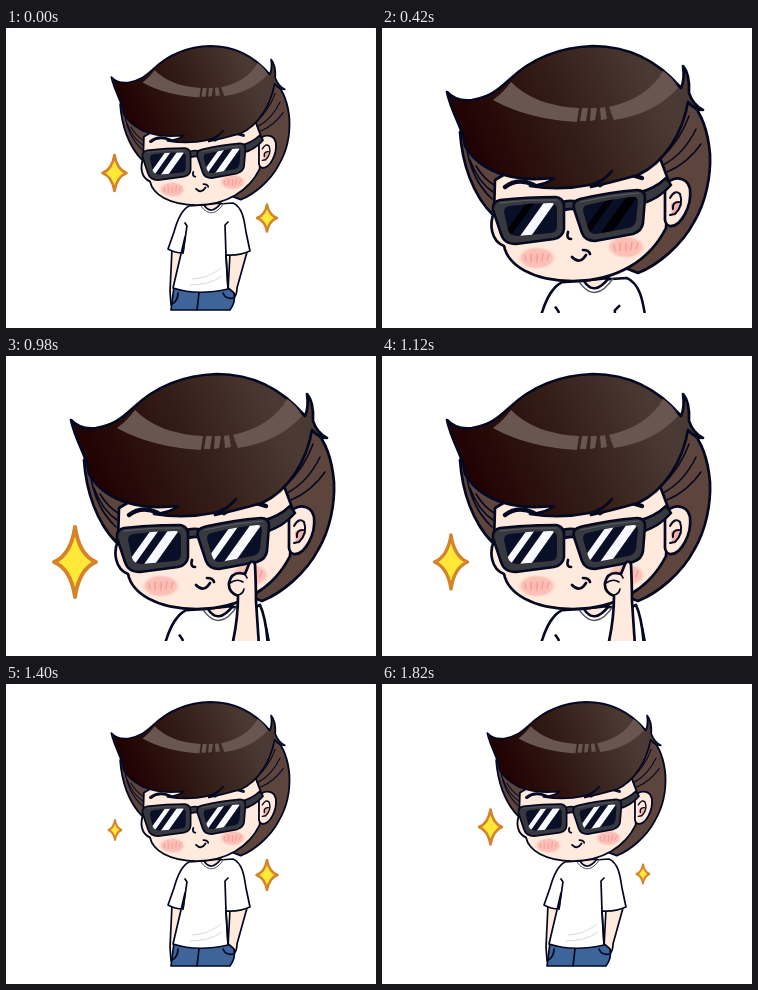
An HTML page for the animation above (1960 ms loop, 370 by 300 pixels).

```html
<!DOCTYPE html>
<html lang="en">
<head>
<meta charset="utf-8">
<title>Cool boy</title>
<style>
html, body { margin: 0; width: 100%; height: 100%; overflow: hidden; background: #fff; }
svg { display: block; width: 370px; height: 300px; }
.ink { stroke: #040820; stroke-width: 2.7; stroke-linejoin: round; stroke-linecap: round; }
.thin { stroke-width: 1.6; }
.line { fill: none; }
.skin { fill: #ffeadd; }
.side { fill: #5d443d; }
.frame { fill: #38383f; stroke: #040820; stroke-width: 2.6; stroke-linejoin: round; }
.shine { fill: #695650; }
.body { stroke-width: 1.7; }
.star { fill: #ffe838; stroke: #d5822a; stroke-linejoin: round; }
</style>
</head>
<body>
<svg viewBox="0 0 370 300">
  <defs>
    <linearGradient id="hair" gradientUnits="userSpaceOnUse" x1="95" y1="120" x2="268" y2="45">
      <stop offset="0" stop-color="#210303"/>
      <stop offset=".5" stop-color="#341d17"/>
      <stop offset="1" stop-color="#4b3a33"/>
    </linearGradient>
    <radialGradient id="blush">
      <stop offset="0" stop-color="#fbb9b1"/>
      <stop offset=".75" stop-color="#fcc2b9"/>
      <stop offset="1" stop-color="#ffe0d4" stop-opacity="0"/>
    </radialGradient>
    <clipPath id="crop"><rect width="370" height="285"/></clipPath>
    <clipPath id="lensL"><path d="M127 178 Q148 175 169 175 Q174 175 175 180 L175 198 Q175 204 169 205 L136 208 Q128 208 126 202 L122 184 Q122 179 127 178Z"/></clipPath>
    <clipPath id="lensR"><path d="M205 177 Q229 171 251 169 Q256 169 256 174 L254 193 Q253 198 247 200 L214 206 Q208 206 206 200 L201 183 Q201 178 205 177Z"/></clipPath>
  </defs>

  <g clip-path="url(#crop)">
    <g id="boy">
      <g transform="translate(190 18) scale(1.477) translate(-190 -18)">
        <g class="ink body">
          <path class="skin" d="M166 221 L164 263 L165 277 L173 270 L177 222Z"/>
          <path class="skin" d="M224 225 L222 263 L228 270 Q231 266 231 260 L241 224Z"/>
          <path fill="#3d6599" d="M168 259 L165 282 L224 282 Q230 274 228 265 L220 258Z"/>
          <path class="line" d="M193 265 L191 282 M172 265 Q172 273 166 276 M217 265 Q220 272 228 270"/>
        </g>
        <path class="ink body" fill="#fff" d="M183 178 C175 182 171 193 168 204 L162 221 Q169 225 177 225 L179 209 L167 260 Q191 268 222 261 L220 227 Q233 228 244 223 L240 204 C238 190 236 179 227 175Z"/>
        <path class="ink body line" d="M177 225 L181 198 L179 195 M220 227 L219 197 L222 194 M220 227 L222 261"/>
        <path class="line" stroke="#d9d9e0" d="M186 251 Q203 250 215 240 M184 257 Q204 257 216 248"/>
        <path class="ink body skin thin" d="M198 177 Q205 188 215 175Z"/>
        <path class="line" stroke="#55555f" d="M195 178 Q206 193 218 175"/>
      </g>

      <path class="ink side" d="M78 104 C80 134 90 167 112 188 L256 245 C276 237 300 217 312 194 C324 174 329 148 328 126 C326 103 320 86 309 74Z"/>
      <path class="ink skin" d="M113 152 L112 185 C107 196 109 213 122 218 C126 237 150 253 191 253 C235 253 268 232 284 200 L287 154 L278 130 L150 130Z"/>
      <path class="ink line thin" d="M85 122 Q90 152 110 171 M88 132 Q96 154 111 164 M94 138 Q102 151 112 157"/>
      <path class="ink line thin" d="M314 101 Q302 126 281 137 M319 116 Q306 135 285 144 M307 88 Q298 113 279 130"/>
      <path class="ink skin" d="M283 160 C287 147 305 147 308 161 C310 178 299 199 288 198 Q282 197 283 187Z"/>
      <path fill="#f4b0a6" d="M289 176 Q297 170 298 176 Q298 184 290 187Z"/>
      <path class="ink line" style="stroke-width:2" d="M288 170 Q293 161 298 166 Q302 177 293 186 L288 187 M297 174 Q290 174 291 181"/>

      <path class="ink line" style="stroke-width:4.5" d="M123 159 Q136 149 152 157 M218 157 Q237 141 260 150"/>

      <path class="ink" fill="url(#hair)" d="M65 64 Q74 74 90 72 C108 69 116 62 127 52 C151 29 179 19 211 18 C246 18 276 33 299 60 Q303 51 301 38 Q308 46 307 65 Q311 77 321 82 Q313 82 306 74 C301 103 284 134 256 147 Q231 154 209 159 Q223 152 230 143 Q221 154 207 157 Q178 163 148 158 Q164 157 172 150 C138 154 101 148 83 118 C81 99 70 87 65 64Z"/>
      <g class="shine">
        <path d="M129 54 Q153 78 197 80 L195 94 Q145 91 111 72 Q121 65 129 54Z"/>
        <path d="M200 80 L206 80 L204 93 L198 93Z M209 80 L215 80 L213 92 L208 93Z M218 80 L223 79 L225 91 L219 92Z"/>
        <path d="M227 79 Q266 70 281 43 Q291 50 296 60 Q272 86 232 92Z"/>
      </g>

      <ellipse cx="155" cy="230" rx="20" ry="12" fill="url(#blush)"/>
      <ellipse cx="244" cy="219" rx="20" ry="12" fill="url(#blush)"/>
      <path class="line" stroke="#ee9a96" stroke-width="1.2" stroke-linecap="round" d="M143 227 l1 6 M149 226 l0 8 M155 226 l0 8 M161 225 l-1 8 M167 226 l-2 6 M232 217 l1 6 M238 215 l0 8 M244 215 l0 8 M250 214 l-1 8 M256 215 l-2 6"/>
      <path class="ink line" d="M186 204 Q184 211 189 211 M190 229 Q198 237 204 227 M201 222 Q207 222 208 226"/>

      <path class="frame" d="M255 165 Q273 161 284 150 L289 157 Q277 171 259 176Z M178 175 Q187 171 196 174 L196 182 Q187 179 178 184Z"/>
      <path class="frame" d="M118 172 Q145 169 174 169 Q181 170 182 177 L182 201 Q181 209 172 211 L134 216 Q122 216 119 206 L111 182 Q110 174 118 172Z"/>
      <path class="frame" d="M198 171 Q228 164 255 162 Q263 162 263 170 L261 195 Q260 203 251 206 L213 213 Q203 213 200 205 L192 181 Q190 173 198 171Z"/>
      <path class="line" stroke="#5c5c64" d="M117 175 Q147 171 175 172 M198 174 Q228 167 257 165"/>
      <g clip-path="url(#lensL)">
        <rect class="glass" x="110" y="165" width="80" height="60"/>
        <g id="glintL"></g>
      </g>
      <g clip-path="url(#lensR)">
        <rect class="glass" x="190" y="160" width="80" height="60"/>
        <g id="glintR"></g>
      </g>

      <g id="hand">
        <path class="ink" fill="#fff" d="M243 254 L254 249 Q260 262 262 290 L250 290Z"/>
        <path class="ink skin" d="M226 290 Q232 264 232 240 Q222 236 223 227 Q225 217 234 217 L239 218 L243 208 Q246 203 249 208 Q250 230 250 245 L253 290Z"/>
        <path class="ink line thin" d="M224 227 Q231 222 237 226 M234 217 Q240 218 241 222 M232 239 Q237 238 238 233"/>
      </g>
    </g>
  </g>
  <path id="starL" class="star"/>
  <path id="starR" class="star"/>
</svg>

<script>
const STEP = 140;
const $ = id => document.getElementById(id);

// zoom, strength of the four glints, left and right star [x, y, half width, half height]
const FULL = [1, 1, 1, 1];
const near = (shine, left, hand) => ({ zoom: 1, shine, left, hand });
const small = (left, right) => ({ zoom: .677, shine: FULL, left, right });
const sweep = n => FULL.map((_, i) => i === n ? 1 : 0);
const bigL = [108.5, 145, 12, 18], tinyL = [109, 146, 6.5, 10];
const bigR = [261, 191, 10.5, 15], tinyR = [261, 190, 6.5, 9.5];

const steps = [
  small(bigL, [261, 190, 10, 13.5]),
  near([0, 0, 0, 0]),
  near(sweep(0)),
  near(sweep(1)),
  near(sweep(2)),
  near(sweep(3)),
  near(FULL),
  near(FULL, [69, 206, 21, 35], true),
  near(FULL, [69, 206, 16.5, 27], true),
  { zoom: .83, shine: FULL, left: [89, 175, 14.5, 23] },
  small(tinyL, bigR),
  small(bigL, tinyR),
  small(tinyL, bigR),
  small([108.5, 143, 11.5, 17.5], tinyR)
];

function stripe(parent, x, y, wide, fill) {
  const p = document.createElementNS("http://www.w3.org/2000/svg", "path");
  p.setAttribute("d", `M${x} ${y} h${wide} l-27 38 h${-wide}Z`);
  p.setAttribute("fill", fill);
  $(parent).append(p);
  return p;
}
// each glint lies on a black band that shows while it is off
const glints = [
  ["glintL", 145, 174, 8], ["glintL", 163, 173, 11],
  ["glintR", 226, 168, 8], ["glintR", 245, 168, 11]
].map(band => {
  stripe(...band, "#010105");
  return stripe(...band, "#f8faff");
});

function star(el, spec) {
  el.style.display = spec ? "" : "none";
  if (!spec) return;
  const [x, y, w, h] = spec;
  const a = w * .2, b = h * .2;
  el.setAttribute("d", `M${x} ${y - h} Q${x + a} ${y - b} ${x + w} ${y} Q${x + a} ${y + b} ${x} ${y + h} Q${x - a} ${y + b} ${x - w} ${y} Q${x - a} ${y - b} ${x} ${y - h}Z`);
  el.setAttribute("stroke-width", Math.min(4, 1 + w * .14));
}

function show(s) {
  $("boy").setAttribute("transform", `translate(190 18) scale(${s.zoom}) translate(-190 -18)`);
  glints.forEach((p, i) => p.setAttribute("opacity", s.shine[i]));
  const glass = s.shine.some(v => v) ? "#0a0f28" : "#000";
  document.querySelectorAll(".glass").forEach(g => g.setAttribute("fill", glass));
  $("hand").style.display = s.hand ? "" : "none";
  star($("starL"), s.left);
  star($("starR"), s.right);
}

const start = performance.now();
let last = -1;
function tick(now) {
  const i = Math.floor(Math.max(0, now - start) / STEP) % steps.length;
  if (i !== last) show(steps[last = i]);
  requestAnimationFrame(tick);
}
tick(start);
</script>
</body>
</html>
```
